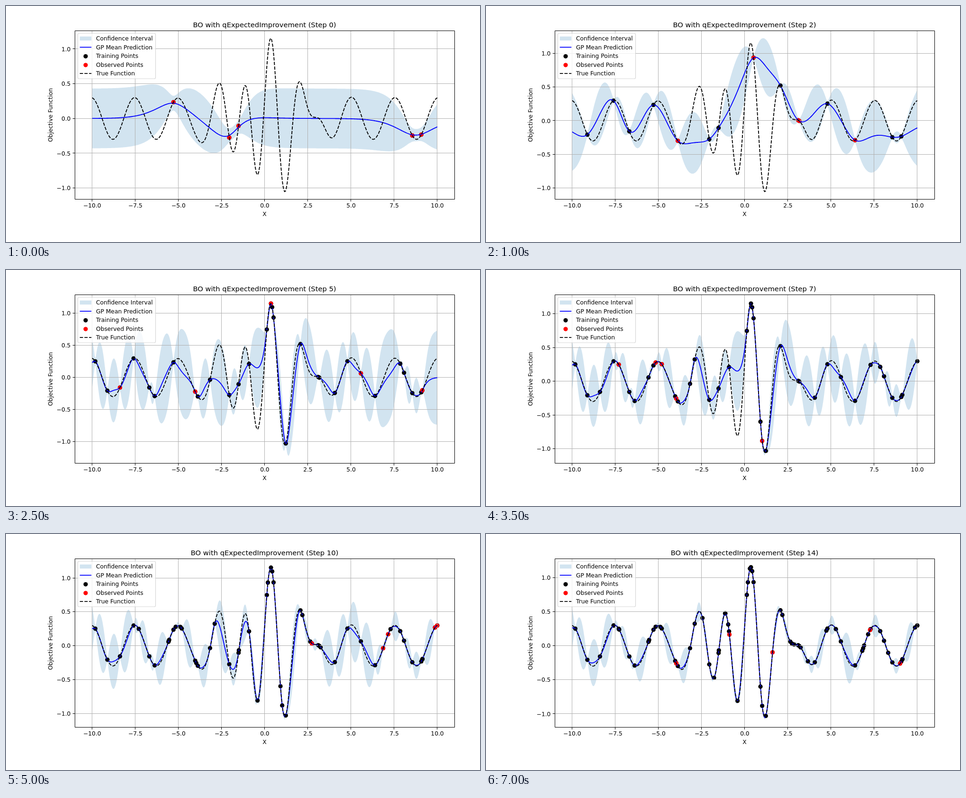
An HTML page with a canvas for the animation above (7500 ms loop, 1000 by 500 pixels).

```html
<!DOCTYPE html>
<html lang="en">
<head>
<meta charset="utf-8">
<title>Bayesian optimisation</title>
<style>
  html, body { margin: 0; width: 100%; height: 100%; overflow: hidden; background: #fff; }
  canvas { display: block; }
</style>
</head>
<body>
<canvas id="plot" width="1000" height="500"></canvas>
<script>
const ctx = document.getElementById('plot').getContext('2d');
const STEP_MS = 500, BATCH = 5;
const LEFT = 145, RIGHT = 946, TOP = 52, BOTTOM = 409.6;
const FONT = 12.25, LINE = 1.84;
const DASH = [3.7 * LINE, 1.6 * LINE];
const BAND = 'rgba(31,119,180,0.2)';

// Samples that shape the fit, one row per step; short rows are filled up by nearbySample.
const keySamples = [
  [-5.29, -2.057, -1.518, 8.55, 9.07],
  [-9.12, -7.6, -6.69, 2.07, 4.79],
  [-3.88, 0.51, 3.1, 3.16, 6.39],
  [-9.82, 0.12, 1.22, 4.06, 7.85],
  [-6.38, -3.17, -0.91, 0.43, 8.07],
  [-8.39, -4.03, 0.36, 5.57, 9.13],
  [-5.58, -2.9, 0.91, 7.29, 10],
  [-7.3, -4.81, 1.01],
  [-0.42, 2.18],
  [-1.5, 2.64],
  [6.86, 7.15],
  [3.66, 8.31],
  [-1.14, 5.28],
  [-2.45, -1.78],
  [-0.89, 1.61]
];

const lengthScale = step => step < 3 ? 1.15 - 0.09 * step : 0.31 + 0.016 * step;
const priorWidth = step => Math.min(0.74, 0.43 + 0.14 * step);
const noiseVariance = step => Math.max(0.0001, 0.003 / 3 ** step);

const objective = x => Math.exp(-0.2 * x * x) * Math.sin(4 * x) + 0.3 * Math.cos(2.5 * x);
const grid = Array.from({ length: 401 }, (_, i) => -10 + i / 20);
const truth = grid.map(objective);

let seed = 7;
function random() {
  seed = (seed * 16807) % 2147483647;
  return seed / 2147483647;
}

function nearbySample(known) {
  const base = known[Math.floor(random() * known.length)];
  return Math.max(-10, Math.min(10, base + (random() - 0.5) * 0.3));
}

const batches = [];
for (const keys of keySamples) {
  const known = batches.flat();
  const batch = [...keys];
  while (batch.length < BATCH) batch.push(nearbySample(known));
  batches.push(batch);
}

// Matérn 5/2 correlation
function matern(distance, scale) {
  const r = Math.sqrt(5) * Math.abs(distance) / scale;
  return (1 + r + r * r / 3) * Math.exp(-r);
}

function cholesky(n, entry) {
  const L = [];
  for (let i = 0; i < n; i++) {
    L.push(new Float64Array(n));
    for (let j = 0; j <= i; j++) {
      let sum = entry(i, j);
      for (let k = 0; k < j; k++) sum -= L[i][k] * L[j][k];
      L[i][j] = i === j ? Math.sqrt(sum) : sum / L[j][j];
    }
  }
  return L;
}

function forwardSolve(L, b) {
  const out = new Float64Array(b.length);
  for (let i = 0; i < b.length; i++) {
    let sum = b[i];
    for (let k = 0; k < i; k++) sum -= L[i][k] * out[k];
    out[i] = sum / L[i][i];
  }
  return out;
}

const dot = (a, b) => a.reduce((sum, v, i) => sum + v * b[i], 0);

// Gaussian process posterior: mean and two standard deviations either side
function fitStep(step) {
  const train = batches.slice(0, step + 1).flat();
  const scale = lengthScale(step);
  const width = priorWidth(step);
  const noise = noiseVariance(step) / (width * width / 4);
  const L = cholesky(train.length, (i, j) => matern(train[i] - train[j], scale) + (i === j ? noise : 0));
  const target = forwardSolve(L, train.map(objective));
  const mean = [], upper = [], lower = [];
  for (const x of grid) {
    const v = forwardSolve(L, train.map(p => matern(x - p, scale)));
    const m = dot(v, target);
    const half = width * Math.sqrt(Math.max(0, 1 - dot(v, v)));
    mean.push(m);
    upper.push(m + half);
    lower.push(m - half);
  }
  const max = Math.max(...upper, ...truth), min = Math.min(...lower, ...truth);
  const margin = (max - min) * 0.05;
  return { train, mean, upper, lower, top: max + margin, bottom: min - margin };
}

const fits = batches.map((_, step) => fitStep(step));

const toX = x => LEFT + 0.4 + (x + 11) * (RIGHT - LEFT) / 22;
const snap = v => Math.floor(v) + 0.5;

function text(str, x, y, align = 'center', size = FONT) {
  ctx.font = `${size}px "DejaVu Sans", sans-serif`;
  ctx.textAlign = align;
  ctx.fillStyle = '#000';
  ctx.fillText(str, x, y);
}

function stroke(color, width, dash = []) {
  ctx.strokeStyle = color;
  ctx.lineWidth = width;
  ctx.setLineDash(dash);
  ctx.stroke();
}

function segment(x1, y1, x2, y2, color, width = 1, dash = []) {
  ctx.beginPath();
  ctx.moveTo(x1, y1);
  ctx.lineTo(x2, y2);
  stroke(color, width, dash);
}

function marker(x, y, color) {
  ctx.beginPath();
  ctx.arc(x, y, 4.6, 0, 2 * Math.PI);
  ctx.fillStyle = color;
  ctx.fill();
}

function drawLegend() {
  const start = 155.7, end = 180.2, middle = 168;
  const rowY = row => 68.9 + row * 18.5;
  ctx.beginPath();
  ctx.roundRect(151.5, 58, 164, 96, 2.5);
  ctx.fillStyle = 'rgba(255,255,255,0.8)';
  ctx.fill();
  stroke('rgba(204,204,204,0.8)', 1.2);
  ctx.fillStyle = BAND;
  ctx.fillRect(start, rowY(0) - 4.3, end - start, 8.6);
  segment(start, rowY(1), end, rowY(1), '#00f', LINE);
  marker(middle, rowY(2) + 0.7, '#000');
  marker(middle, rowY(3) + 0.7, '#f00');
  segment(start, rowY(4), end, rowY(4), '#000', LINE, DASH);
  ['Confidence Interval', 'GP Mean Prediction', 'Training Points', 'Observed Points', 'True Function']
    .forEach((label, row) => text(label, 190, rowY(row) + 4.5, 'left'));
}

function draw(step) {
  const fit = fits[step];
  const toY = y => TOP + (fit.top - y) * (BOTTOM - TOP) / (fit.top - fit.bottom);
  const trace = values => values.forEach((y, i) => ctx.lineTo(toX(grid[i]), toY(y)));
  const label = v => v.toFixed(1).replace('-', '\u2212');

  ctx.fillStyle = '#fff';
  ctx.fillRect(0, 0, 1000, 500);

  ctx.beginPath();
  trace(fit.upper);
  for (let i = grid.length - 1; i >= 0; i--) ctx.lineTo(toX(grid[i]), toY(fit.lower[i]));
  ctx.fillStyle = BAND;
  ctx.fill();

  for (const x of fit.train) marker(toX(x), toY(objective(x)), '#000');
  for (const x of batches[step]) marker(toX(x), toY(objective(x)), '#f00');

  for (let v = -10; v <= 10; v += 2.5) {
    const x = snap(toX(v));
    segment(x, TOP, x, BOTTOM, '#b0b0b0');
    segment(x, BOTTOM, x, BOTTOM + 4.6, '#000');
    text(label(v), toX(v), 427.4);
  }
  for (let v = -1; v <= 1; v += 0.5) {
    const y = snap(toY(v));
    segment(LEFT, y, RIGHT, y, '#b0b0b0');
    segment(LEFT - 4.3, y, LEFT, y, '#000');
    text(label(v), 136.4, toY(v) + 4.6, 'right');
  }

  ctx.lineJoin = 'round';
  ctx.beginPath();
  trace(fit.mean);
  stroke('#00f', LINE);
  ctx.beginPath();
  trace(truth);
  stroke('#000', LINE, DASH);

  ctx.beginPath();
  ctx.rect(snap(LEFT), snap(TOP), RIGHT - LEFT, snap(BOTTOM) - snap(TOP));
  stroke('#000', 1);

  text(`BO with qExpectedImprovement (Step ${step})`, 545.5, 44.5, 'center', FONT * 1.2);
  text('X', 545.5, 445.3);
  ctx.save();
  ctx.translate(98.3, 231);
  ctx.rotate(-Math.PI / 2);
  text('Objective Function', 0, 0);
  ctx.restore();
  drawLegend();
}

function tick() {
  draw(Math.floor(performance.now() / STEP_MS) % batches.length);
  requestAnimationFrame(tick);
}
tick();
</script>
</body>
</html>
```
